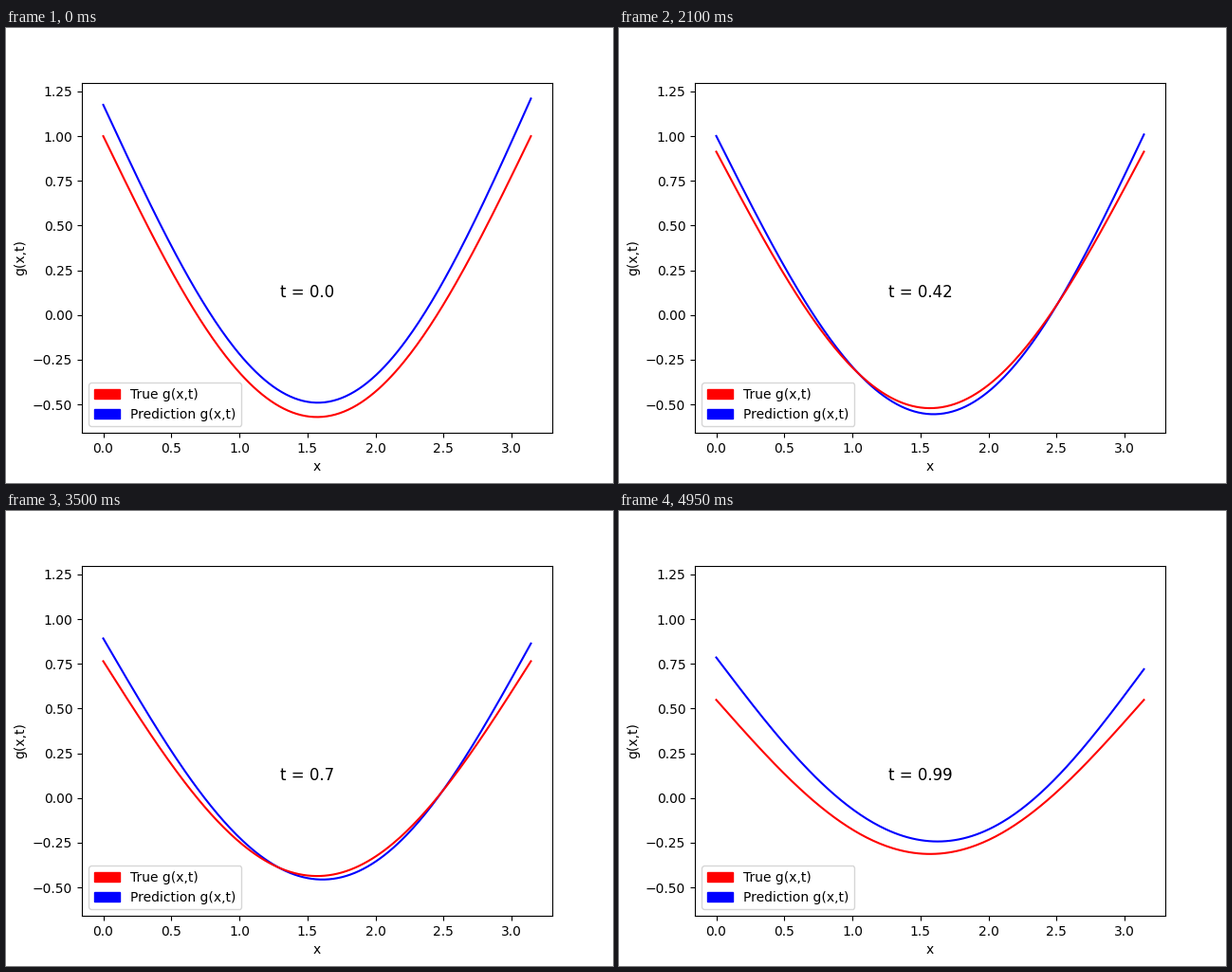
Recreate the animation shown at these times as a matplotlib script. Size 640 by 480 pixels, loop 5000 ms.

```python
import numpy as np
import matplotlib.pyplot as plt
from matplotlib.animation import FuncAnimation
from matplotlib.patches import Patch

FRAMES = 100
INTERVAL = 50

x = np.linspace(0, np.pi, 200)


def true_g(t):
    return (1 - np.pi / 2 * np.sin(x)) * np.cos(t)


def predicted_g(t):
    # Heights at x = 0, pi and pi/2
    left = 1.175 - 0.43 * t + 0.037 * t**2
    right = 1.2104 - 0.425 * t - 0.17 * t**2 + 0.1 * t**3
    middle = -0.4905 - 0.474 * t + 0.79 * t**2 - 0.058 * t**3
    # Overtones that vanish at those three points
    skew = 0.010 + 0.041 * t - 0.035 * t**2
    bend = 0.003 - 0.008 * t

    chord = left + (right - left) * x / np.pi
    depth = (left + right) / 2 - middle
    return (chord - depth * np.sin(x) + skew * np.sin(2 * x)
            + bend * (np.sin(3 * x) + np.sin(x)))


fig, ax = plt.subplots(figsize=(6.4, 4.8), dpi=100)
low, high = true_g(0).min(), predicted_g(0).max()
pad = 0.05 * (high - low)
ax.set_xlim(-0.05 * np.pi, 1.05 * np.pi)
ax.set_ylim(low - pad, high + pad)
ax.set_xlabel("x")
ax.set_ylabel("g(x,t)")

pred_line, = ax.plot(x, predicted_g(0), color="blue")
true_line, = ax.plot(x, true_g(0), color="red")
label = ax.text(1.5, 0.1, "t = 0.0", fontsize=12, ha="center")
ax.legend(handles=[Patch(color="red", label="True g(x,t)"),
                   Patch(color="blue", label="Prediction g(x,t)")],
          loc="lower left")


def update(frame):
    t = frame / FRAMES
    true_line.set_ydata(true_g(t))
    pred_line.set_ydata(predicted_g(t))
    label.set_text(f"t = {t}")
    return true_line, pred_line, label


anim = FuncAnimation(fig, update, frames=FRAMES, interval=INTERVAL,
                     repeat=True, repeat_delay=0)
plt.show()
```
